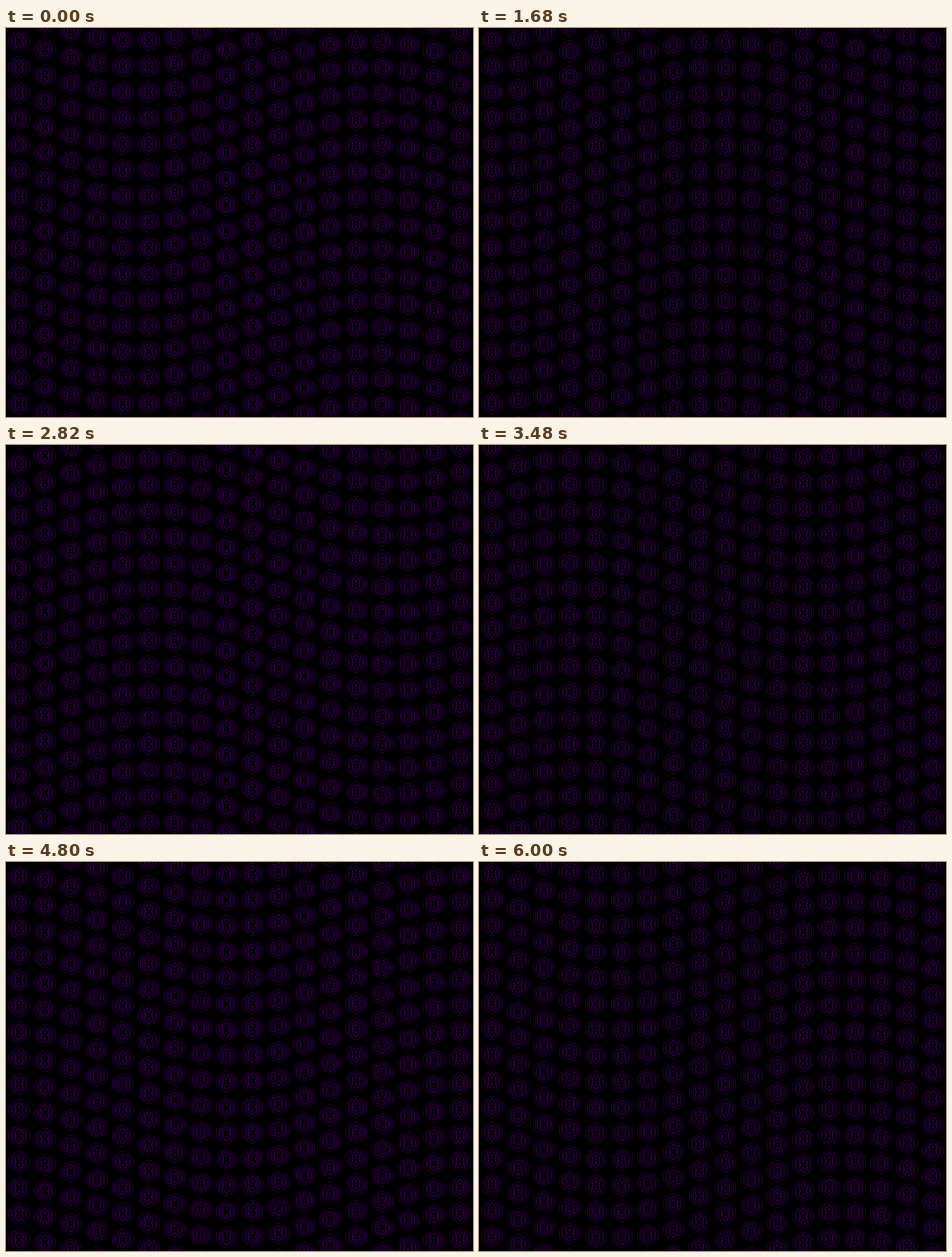
An HTML page that plays this animation: 612x510 px, repeating every 6.06 s.

```html
<!DOCTYPE html>
<html lang="en">
<head>
<meta charset="utf-8">
<title>Wave of rosettes</title>
<style>
  html, body { margin: 0; width: 100%; height: 100%; overflow: hidden; background: #000; }
  svg { display: block; width: 612px; height: 510px; }
</style>
</head>
<body>
<svg id="stage" viewBox="0 0 612 510" fill="none" stroke-width="1">
  <defs>
    <g id="rosette">
      <path id="rim" stroke="#240036"/>
      <path id="cells" stroke="#28003c"/>
      <path id="core" stroke="#2a0040"/>
    </g>
  </defs>
</svg>
<script>
const NS = 'http://www.w3.org/2000/svg';
const STEP = 34, COLS = 18, ROWS = 15, SWING = 34;
const LOOP = 6060, TICK = 60, STEPS = 100;
const stage = document.getElementById('stage');

// Closed outline from its top-right quarter, mirrored on both axes.
function ring(quarter) {
  const flip = (sx, sy) => quarter.map(([x, y]) => [x * sx, y * sy]);
  const points = [
    ...flip(1, 1), ...flip(1, -1).reverse(),
    ...flip(-1, -1), ...flip(-1, 1).reverse()
  ];
  return 'M' + points.join('L') + 'Z';
}

const box = (x, y, w, h) => `M${x} ${y}h${w}v${h}h${-w}z`;

// The same box in all mirrored places.
function boxes(x, y, w, h) {
  const xs = new Set([x, -x - w]), ys = new Set([y, -y - h]);
  return [...xs].flatMap(a => [...ys].map(b => box(a, b, w, h))).join('');
}

function setPath(id, d) {
  document.getElementById(id).setAttribute('d', d);
}

setPath('rim', ring([
  [2.5, -13.5], [4.5, -11.5], [4.5, -10.5], [8.5, -10.5],
  [10.5, -8.5], [10.5, -7.5], [13.5, -5.5]
]));
setPath('cells',
  boxes(8.5, -5.5, 2, 4) + boxes(8.5, -1.5, 2, 3) +
  boxes(-1.5, -10.5, 3, 2) + boxes(5.5, -8.5, 2, 2));
setPath('core',
  boxes(4.5, -5.5, 1, 4) + boxes(3.5, -1.5, 1, 3) +
  boxes(-1.5, -5.5, 3, 2) + boxes(-0.5, -0.5, 1, 1) +
  boxes(2.5, -8.5, 1, 2));

function add(name, parent, attrs = {}) {
  const el = document.createElementNS(NS, name);
  for (const key in attrs) el.setAttribute(key, attrs[key]);
  return parent.appendChild(el);
}

const columns = Array.from({ length: COLS }, () => {
  const col = add('g', stage);
  for (let row = -2; row < ROWS + 2; row++) {
    add('use', col, { href: '#rosette', y: row * STEP });
  }
  return col;
});

function draw(time) {
  // The first pose is held for two ticks.
  const n = Math.max(0, Math.floor((time % LOOP) / TICK) - 1);
  columns.forEach((col, i) => {
    const wave = Math.sin(2 * Math.PI * (i / COLS + n / STEPS));
    const x = STEP * (i + 0.5);
    const y = STEP / 2 + Math.trunc(SWING * wave);
    col.setAttribute('transform', `translate(${x} ${y})`);
  });
}

const start = performance.now();
function tick() {
  draw(performance.now() - start);
  requestAnimationFrame(tick);
}
tick();
</script>
</body>
</html>
```
